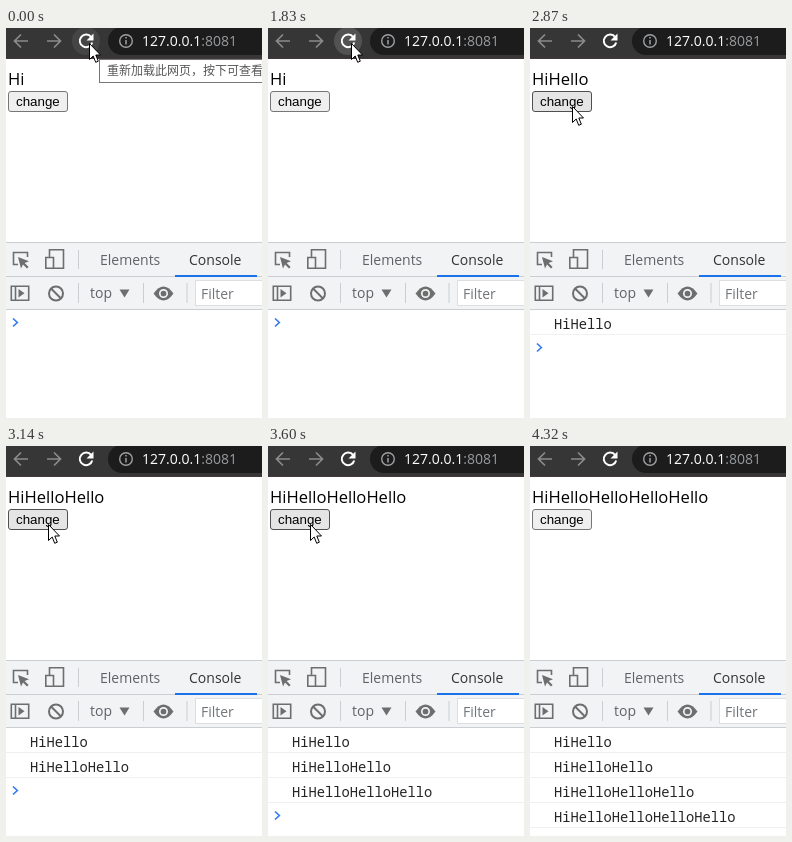
An HTML page for the animation above (4720 ms loop, 256 px wide and 390 px high).

```html
<!DOCTYPE html>
<html lang="en">
<head>
<meta charset="utf-8">
<title>Change button and console</title>
<style>
  html, body { margin: 0; width: 100%; height: 100%; overflow: hidden; background: #fff; }
  svg { display: block; width: 256px; height: 390px; font: 14px "Open Sans", "Noto Sans", sans-serif; }
  text { white-space: pre; }
  .line { fill: none; stroke: #6e6e6e; stroke-width: 1.6; }
  .nav { fill: none; stroke: #8b8b8b; stroke-width: 1.7; }
  .rule { stroke: #cacdd1; }
  .mono { font: 13.75px "Noto Sans Mono", "DejaVu Sans Mono", monospace; fill: #242424; }
</style>
</head>
<body>
<svg viewBox="0 0 256 390">
  <!-- browser bar -->
  <rect width="256" height="31" fill="#363636"/>
  <rect y="30" width="256" height="1" fill="#43393d"/>
  <path class="nav" d="M22 13H9M15 6.5L8.5 13L15 19.5M41 13H54M48 6.5L54.500 13L48 19.500"/>
  <circle id="halo" cx="80" cy="13" r="14" fill="#fff"/>
  <path d="M85.200 9.200A6.300 6.300 0 1 0 86.200 14.500" fill="none" stroke="#fff" stroke-width="2"/>
  <path d="M87.500 5.500V12.500H80.500Z" fill="#fff"/>
  <rect x="102" y="-1" width="180" height="28" rx="14" fill="#1c1c1d"/>
  <circle cx="120" cy="13" r="6.300" fill="none" stroke="#9da0a3" stroke-width="1.400"/>
  <path d="M120 12V16.500M120 9V10.600" stroke="#9da0a3" stroke-width="1.500"/>
  <text x="136" y="18" fill="#fff">127.0.0.1<tspan fill="#9a9da0">:8081</tspan></text>

  <!-- page -->
  <text id="message" x="2" y="57" font-size="16.600"></text>
  <rect id="button" x="2.500" y="63.500" width="59" height="20" rx="2.500"/>
  <text x="10" y="78" style="font:13.333px 'Liberation Sans',Arial,sans-serif">change</text>

  <!-- developer tools -->
  <rect y="214" width="256" height="68" fill="#f1f3f4"/>
  <path class="rule" d="M0 214.500H256M0 248.500H256M0 281.500H256M72.500 222V241M72.500 255V275M137.500 255V275M181 255V275"/>
  <path class="line" d="M12 236.500H7.500V224.500H21.500V229" stroke-width="1.400"/>
  <path d="M12 229L23 233.200L18.600 235L22.600 239L21 240.500L17 236.600L15 240.500Z" fill="#6e6e6e"/>
  <path class="line" d="M43.500 229V221.800H57.500V240.200H48M39.800 229.500H47.500V240.200H39.800Z"/>
  <text x="94" y="237" fill="#5f6368">Elements</text>
  <text x="183" y="237" fill="#333">Console</text>
  <rect x="169" y="247" width="82" height="2" fill="#1a73e8"/>
  <path class="line" d="M5.300 258.300H22.700V272.200H5.300ZM9.500 258V272"/>
  <path d="M12.500 261L18.500 265.300L12.500 269.500Z" fill="#6e6e6e"/>
  <g class="line" style="stroke-width:2"><circle cx="50" cy="265.500" r="7"/><path d="M45 260.500L55 270.500"/></g>
  <text x="84" y="270" fill="#5f6368">top</text>
  <path d="M113.500 261.500H123.500L118.500 269.500Z" fill="#6e6e6e"/>
  <path d="M147.500 265.500Q157.500 251.500 167.500 265.500Q157.500 279.500 147.500 265.500Z" fill="#6e6e6e"/>
  <circle cx="157.500" cy="265.500" r="3.700" fill="#6e6e6e" stroke="#f1f3f4" stroke-width="1.700"/>
  <rect x="189.500" y="252.500" width="80" height="25" fill="#fff" stroke="#dcdee1"/>
  <text x="195" y="271" fill="#70757a">Filter</text>
  <g id="logs"></g>
  <path id="prompt" d="M7 -4L11.300 0L7 4" fill="none" stroke="#367cf1" stroke-width="1.700"/>

  <g id="tooltip">
    <rect x="93.500" y="31.500" width="180" height="23" fill="#fff" stroke="#767676"/>
    <text x="101" y="47" fill="#575757" style="font:12px 'Noto Sans CJK SC','Noto Sans CJK',sans-serif">重新加载此网页，按下可查看</text>
  </g>
  <path id="cursor" d="M.5 .5V16.500L4.200 13L6.700 19.300L9.300 18.200L6.800 12H11.500Z" fill="#fff" stroke="#000"/>
</svg>
<script>
const LOOP = 4720;
const ROW = 25;
const BUTTON = {
  normal: ["#efefef", "#767676"],
  hover: ["#e5e5e5", "#4f4f4f"],
  active: ["#f5f5f5", "#8d8d8d"]
};

// Each track lists [start time, value]; values hold until the next entry.
const tracks = {
  halo: [[0, .08], [1160, .09], [1440, .1], [1560, .115], [1680, .13], [1830, .14], [2070, 0]],
  cursor: [[0, [83, 15]], [2070, [68, 35]], [2220, [50, 71]], [2360, [42, 79]],
           [2870, [42, 78]], [4190, [241, 340]], [4320, null]],
  button: [[0, "normal"], [2220, "hover"], [2480, "active"], [2620, "hover"],
           [3020, "active"], [3140, "hover"], [3450, "active"], [3600, "hover"],
           [3880, "active"], [4030, "hover"], [4190, "normal"]],
  clicks: [[0, 0], [2620, 1], [3140, 2], [3600, 3], [4030, 4]]
};

const el = id => document.getElementById(id);
const valueAt = (track, t) => track.findLast(([start]) => start <= t)[1];
const greeting = n => "Hi" + "Hello".repeat(n);
const show = (node, on) => node.setAttribute("display", on ? "inline" : "none");
const move = (node, x, y) => node.setAttribute("transform", `translate(${x} ${y})`);

el("logs").innerHTML = [1, 2, 3, 4].map(n => {
  const top = 282 + (n - 1) * ROW;
  return `<g><text class="mono" x="24" y="${top + 19}">${greeting(n)}</text>
    <path d="M0 ${top + 24.5}H256" stroke="#f0f0f0"/></g>`;
}).join("");
const logRows = [...el("logs").children];

function draw(t) {
  const cursor = valueAt(tracks.cursor, t);
  const clicks = valueAt(tracks.clicks, t);
  const [fill, border] = BUTTON[valueAt(tracks.button, t)];

  show(el("tooltip"), t < 710);
  el("halo").setAttribute("opacity", valueAt(tracks.halo, t));
  el("button").setAttribute("fill", fill);
  el("button").setAttribute("stroke", border);
  el("message").textContent = greeting(clicks);
  logRows.forEach((row, i) => show(row, i < clicks));
  move(el("prompt"), 0, 294.5 + clicks * ROW);
  show(el("cursor"), cursor);
  if (cursor) move(el("cursor"), ...cursor);
}

const began = performance.now();
function tick() {
  draw((performance.now() - began) % LOOP);
  requestAnimationFrame(tick);
}
tick();
</script>
</body>
</html>
```
